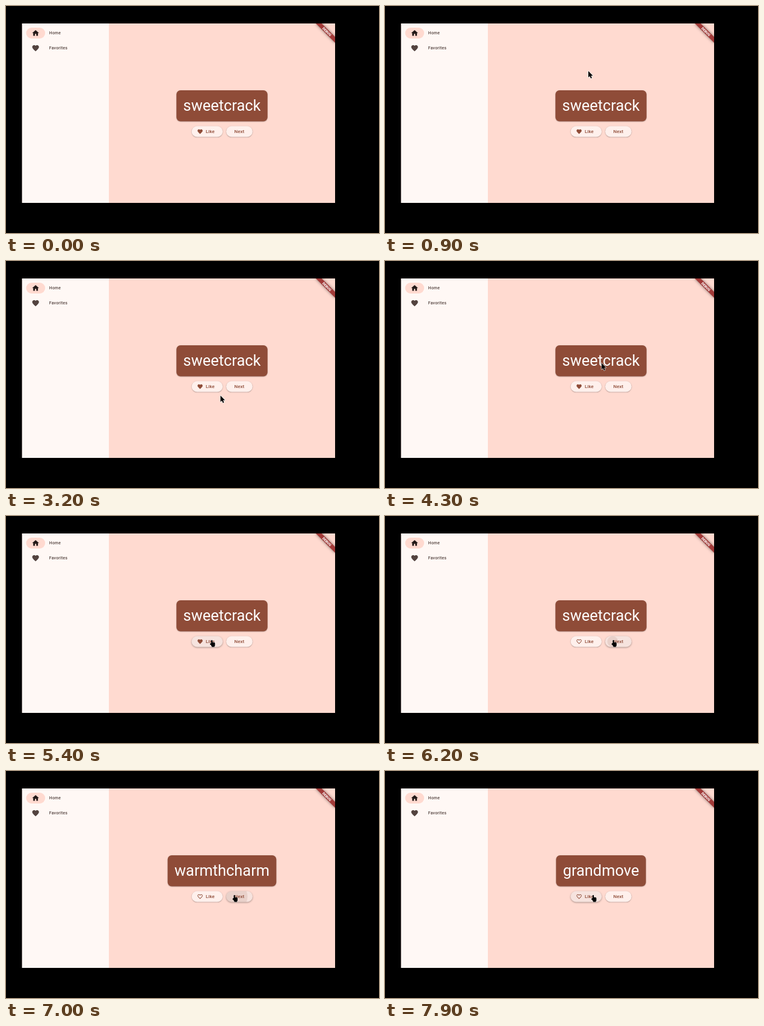
Write an HTML page with a canvas that moves like this. It is 620 px wide and 377 px high and loops after 8000 ms.

```html
<!DOCTYPE html>
<html lang="en">
<head>
<meta charset="utf-8">
<title>Word pairs</title>
<style>
html, body { margin: 0; width: 100%; height: 100%; overflow: hidden; background: #000; }
canvas { display: block; }
</style>
</head>
<body>
<canvas id="stage" width="620" height="377"></canvas>
<script>
const ctx = document.getElementById('stage').getContext('2d');
const LOOP = 8000, STEP = 100, UNIT = 0.5645;
const PRIMARY = '#8f4c38', CONTAINER = '#ffdad0', SURFACE = '#fff8f5', MUTED = '#53433f';
const APP = { x: 26.5, y: 29, w: 520.5, h: 298 };
const LIKE = { x: 308.6, y: 199.5, w: 51.6, h: 18 };
const NEXT = { x: 366, y: 199.5, w: 43.8, h: 18 };

const HOME = new Path2D('M10 20v-6h4v6h5v-8h3L12 3 2 12h3v8z');
const HEART = new Path2D('M12 21.35l-1.45-1.32C5.4 15.36 2 12.28 2 8.5 2 5.42 4.42 3 7.5 3' +
  'c1.74 0 3.41.81 4.5 2.09C13.09 3.81 14.76 3 16.5 3 19.58 3 22 5.42 22 8.5' +
  'c0 3.78-3.4 6.86-8.55 11.54z');
const ARROW = new Path2D('M0 0V10.6L2.4 8.4 4.1 12.3 5.9 11.5 4.3 7.7H7.5z');

const WORDS = [[0, 'sweetcrack'], [6400, 'coldfront'], [6800, 'warmthcharm'], [7300, 'grandmove']];
const PRESSES = [[5500, LIKE], [6100, NEXT], [6700, NEXT], [7200, NEXT]];
const UNLIKED_AT = 5600;

// Pointer route: time, x, y
const ROUTE = [
  [400, 446, 198], [800, 334.5, 108], [900, 338, 108], [2300, 338, 108],
  [2500, 423, 150], [2700, 400, 238], [2900, 320, 244], [3200, 356.5, 223.5],
  [3500, 340, 206], [3800, 340, 206], [4000, 368, 176], [4100, 360, 169.5],
  [4900, 360, 169.5], [5300, 342, 206], [5800, 342, 206], [6100, 379.5, 206],
  [7500, 379.5, 206], [7800, 346, 206]
];
// Grab shapes replace the arrow while it rests above the card
const GRABS = [[1500, 'open'], [1900, 'fist'], [2000, 'open'], [2200, 'fist'], [2400, '']];

function latest(list, t) {
  let value = '';
  for (const [at, v] of list) if (t >= at) value = v;
  return value;
}

function pointerAt(t) {
  if (t < ROUTE[0][0]) return null;
  const i = ROUTE.findIndex(p => p[0] > t);
  if (i < 0) return { x: ROUTE.at(-1)[1], y: ROUTE.at(-1)[2] };
  const [t0, x0, y0] = ROUTE[i - 1], [t1, x1, y1] = ROUTE[i];
  let k = (t - t0) / (t1 - t0);
  k = k * k * (3 - 2 * k);
  return { x: x0 + (x1 - x0) * k, y: y0 + (y1 - y0) * k };
}

const inside = (p, b) => p && p.x >= b.x && p.x <= b.x + b.w && p.y >= b.y && p.y <= b.y + b.h;

function shadow(color, blur, dy) {
  ctx.shadowColor = color;
  ctx.shadowBlur = blur;
  ctx.shadowOffsetY = dy;
}

function pill(b, r, color) {
  ctx.beginPath();
  ctx.roundRect(b.x, b.y, b.w, b.h, r);
  ctx.fillStyle = color;
  ctx.fill();
}

function text(str, x, y, size, weight, color, spacing = 0) {
  ctx.font = `${weight} ${size}px Roboto, sans-serif`;
  ctx.letterSpacing = spacing + 'px';
  ctx.fillStyle = color;
  ctx.fillText(str, x, y);
}

function icon(path, cx, cy, size, color, hollow) {
  ctx.save();
  ctx.translate(cx - size / 2, cy - size / 2);
  ctx.scale(size / 24, size / 24);
  if (hollow) {
    ctx.clip(path);
    ctx.lineWidth = 4;
    ctx.strokeStyle = color;
    ctx.stroke(path);
  } else {
    ctx.fillStyle = color;
    ctx.fill(path);
  }
  ctx.restore();
}

function sidebar() {
  ctx.fillStyle = SURFACE;
  ctx.fillRect(APP.x, APP.y, 144.5, APP.h);
  pill({ x: 33.5, y: 36, w: 31.6, h: 18 }, 9, CONTAINER);
  icon(HOME, 49.2, 45, 13.5, '#231917');
  icon(HEART, 49.2, 70, 13.5, MUTED);
  text('Home', 71.8, 47.4, 6.8, 500, MUTED, 0.28);
  text('Favorites', 71.8, 72.4, 6.8, 500, MUTED, 0.28);
}

function banner() {
  ctx.save();
  ctx.translate(APP.x + APP.w, APP.y);
  ctx.rotate(Math.PI / 4);
  ctx.scale(UNIT, UNIT);
  shadow('rgba(0,0,0,.5)', 5, 0);
  ctx.fillStyle = '#a23a38';
  ctx.fillRect(-40, 28, 80, 12);
  shadow('transparent', 0, 0);
  ctx.textAlign = 'center';
  text('DEBUG', 0, 37.7, 10.2, 900, '#fff');
  ctx.restore();
}

function card(word) {
  ctx.font = '400 25.4px Roboto, sans-serif';
  ctx.letterSpacing = '0px';
  const w = ctx.measureText(word).width;
  ctx.save();
  shadow('rgba(0,0,0,.3)', 1.5, 0.6);
  pill({ x: 359 - w / 2 - 11.3, y: 140, w: w + 22.6, h: 51.6 }, 6.8, PRIMARY);
  ctx.restore();
  text(word, 359 - w / 2, 174.4, 25.4, 400, '#fff');
}

function button(b, label, labelX, t, pointer) {
  const hover = inside(pointer, b);
  ctx.save();
  shadow('rgba(0,0,0,.35)', hover ? 3 : 1.6, hover ? 1 : 0.6);
  pill(b, 9, '#fff0ec');
  ctx.restore();
  if (hover) pill(b, 9, 'rgba(143,76,56,.08)');

  ctx.save();
  ctx.beginPath();
  ctx.roundRect(b.x, b.y, b.w, b.h, 9);
  ctx.clip();
  for (const [at, target] of PRESSES) {
    const age = t - at;
    if (target !== b || age < 0 || age > 700) continue;
    ctx.beginPath();
    ctx.arc(b === NEXT ? 378.5 : 341, 208.5, 2 + age * 0.07, 0, 7);
    ctx.fillStyle = `rgba(143,76,56,${0.12 * Math.min(1, (700 - age) / 300)})`;
    ctx.fill();
  }
  ctx.restore();
  text(label, labelX, 211.4, 7.9, 500, PRIMARY, 0.06);
}

function inked(path, edge) {
  ctx.lineJoin = 'round';
  ctx.lineWidth = edge;
  ctx.strokeStyle = 'rgba(255,255,255,.8)';
  ctx.stroke(path);
  ctx.fillStyle = '#000';
  ctx.fill(path);
}

function handPath(kind) {
  const p = new Path2D();
  if (kind === 'point') {
    p.roundRect(-1, 0, 2.2, 7, 1);
    p.roundRect(-1, 3.8, 6.4, 7, 1.8);
    p.roundRect(-2.8, 5.2, 3, 3, 1.2);
    p.rect(0, 9, 4.6, 2.4);
    return p;
  }
  const top = kind === 'open' ? 0 : 2.4;
  for (let i = 0; i < 4; i++) {
    p.roundRect(1.6 + i * 1.9, top + (i % 3 ? 0 : 0.9), 1.9, 6, 0.9);
  }
  p.roundRect(1.4, 4, 7.8, 5.6, 1.6);
  p.roundRect(0.4, 5, 2.6, 2.8, 1);
  return p;
}

function cursor(p, t) {
  const grab = latest(GRABS, t);
  const pointing = inside(p, LIKE) || inside(p, NEXT);
  ctx.save();
  ctx.translate(p.x, p.y);
  if (grab) inked(handPath(grab), 0.6);
  else if (pointing) inked(handPath('point'), 0.6);
  else inked(ARROW, 1.3);
  ctx.restore();
}

function draw(t) {
  const pointer = pointerAt(t);
  ctx.fillStyle = '#000';
  ctx.fillRect(0, 0, 620, 377);

  ctx.save();
  ctx.beginPath();
  ctx.rect(APP.x, APP.y, APP.w, APP.h);
  ctx.clip();
  ctx.fillStyle = CONTAINER;
  ctx.fillRect(APP.x, APP.y, APP.w, APP.h);
  sidebar();
  card(latest(WORDS, t));
  button(LIKE, 'Like', 332, t, pointer);
  icon(HEART, 322.6, 208.6, 10.2, PRIMARY, t >= UNLIKED_AT);
  button(NEXT, 'Next', 379.5, t, pointer);
  banner();
  ctx.restore();

  if (pointer) cursor(pointer, t);
}

const start = performance.now();
function tick() {
  const t = (performance.now() - start) % LOOP;
  draw(Math.floor(t / STEP) * STEP);
  requestAnimationFrame(tick);
}
tick();
</script>
</body>
</html>
```
